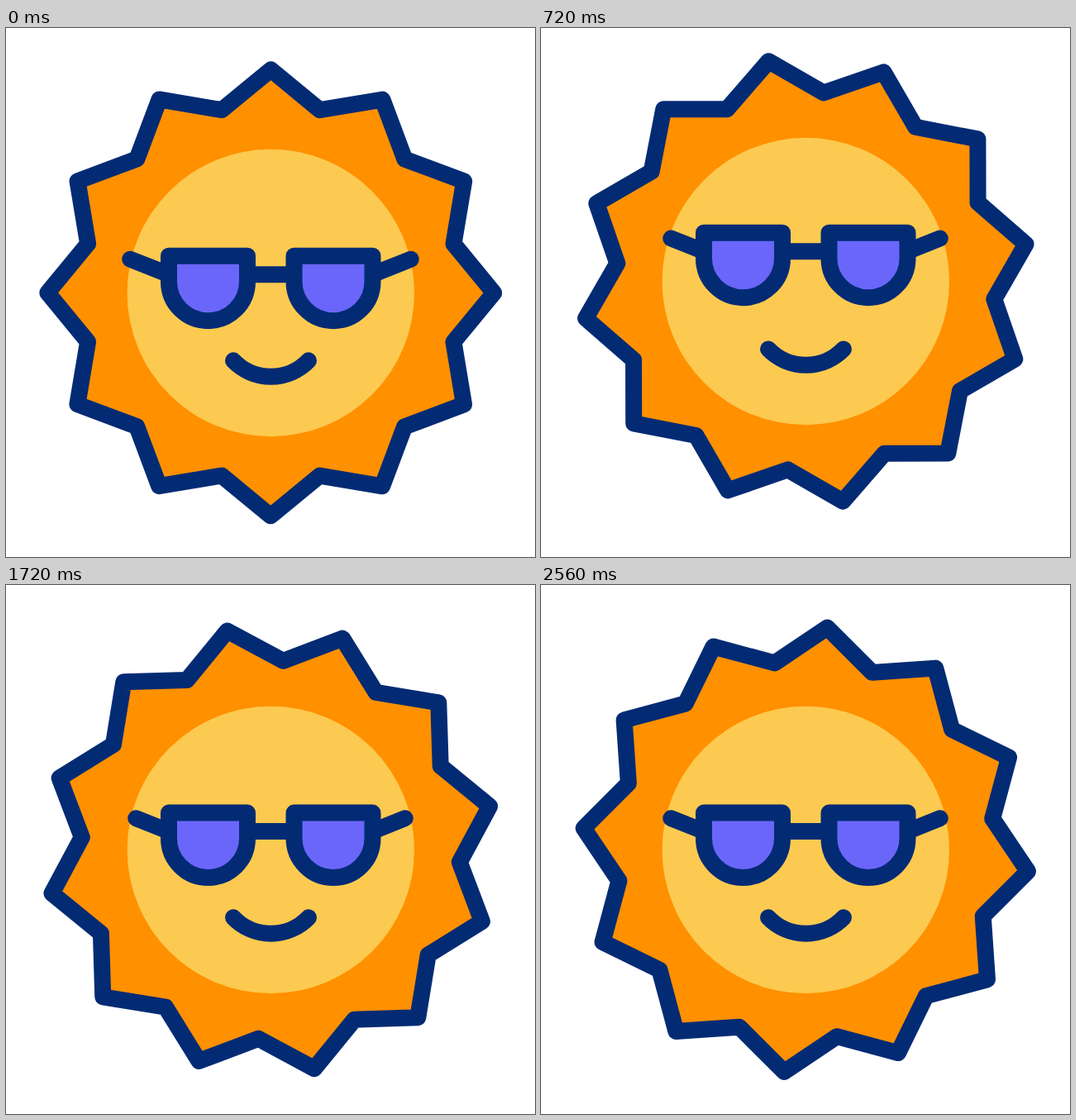
Animation of 640 by 640 pixels, one loop 2.6 s. Source, as an HTML page:

```html
<!DOCTYPE html>
<html lang="en">
<head>
<meta charset="utf-8">
<title>Sunny</title>
<style>
  html, body { margin: 0; height: 100%; overflow: hidden; background: #fff; }
  svg { display: block; width: 100%; height: 100%; }
  .line { fill: none; stroke: #032b74; stroke-width: 20; stroke-linecap: round; stroke-linejoin: round; }
</style>
</head>
<body>
<svg viewBox="0 0 640 640">
  <g id="sun">
    <polygon id="rays" class="line" style="fill:#ff9000"/>
    <circle cx="320.3" cy="320.4" r="173.7" fill="#fcca50"/>
    <path class="line" d="M275 402.3a63 63 0 0 0 91 0"/>
  </g>
  <g id="glasses" class="line">
    <path id="temples"/>
    <path d="M292 298H348"/>
    <path fill="#6b66fa" d="M197 275.5h95v31a47.5 47.5 0 0 1-95 0zM348.5 275.5h95v31a47.5 47.5 0 0 1-95 0z"/>
  </g>
</svg>
<script>
const LOOP = 2600, CENTER = 320.3, SPEED = 0.02833, BRAKE = 2030;
// time, sun offset, glasses offset
const KEYS = [
  [0, 0, 0], [300, 21.2, 42], [360, 20.2, 40.6], [560, -13, -26], [640, -22.3, -44.5],
  [720, -14, -28], [1010, 9.7, 21], [1080, 8.2, 19], [1350, -11.8, -23.5],
  [1440, -8.6, -17.2], [1667, 0, 0], [LOOP, 0, 0]
];
const $ = id => document.getElementById(id);

$('rays').setAttribute('points', Array.from({ length: 24 }, (_, i) => {
  const a = i * Math.PI / 12, r = i % 2 ? 229 : 270;
  return [CENTER + r * Math.sin(a), CENTER - r * Math.cos(a)].map(v => v.toFixed(2));
}).join(' '));

const slope = (i, c) => (KEYS[i + 1][c] - KEYS[i][c]) / (KEYS[i + 1][0] - KEYS[i][0]);

// Tangent that stays flat at every turning point
function tangent(i, c) {
  if (i === 0) return slope(0, c);
  if (i === KEYS.length - 1) return 0;
  const a = slope(i - 1, c), b = slope(i, c);
  return a * b > 0 ? 2 * a * b / (a + b) : 0;
}

function bounce(t, c) {
  const i = KEYS.findIndex((k, n) => n < KEYS.length - 1 && t < KEYS[n + 1][0]);
  const [a, b] = [KEYS[i], KEYS[i + 1]], span = b[0] - a[0];
  const u = (t - a[0]) / span, v = 1 - u;
  return v * v * (1 + 2 * u) * a[c] + u * u * (3 - 2 * u) * b[c]
    + span * u * v * (v * tangent(i, c) - u * tangent(i + 1, c));
}

function spin(t) {
  const late = Math.max(0, t - BRAKE);
  return SPEED * (t - late * late / (2 * (LOOP - BRAKE)));
}

function draw(t) {
  const p = Math.min(1, Math.max(0, (t - 360) / 300)), tuck = p * p * (3 - 2 * p);
  const x = 150.3 + 7 * tuck, y = 279.6 + 2.7 * tuck;
  $('sun').setAttribute('transform', `translate(0 ${bounce(t, 1)})`);
  $('rays').setAttribute('transform', `rotate(${spin(t)} ${CENTER} ${CENTER})`);
  $('glasses').setAttribute('transform', `translate(0 ${bounce(t, 2)})`);
  $('temples').setAttribute('d', `M${x} ${y}L197 298M${640 - x} ${y}L443.5 298`);
}

function tick() {
  draw(performance.now() % LOOP);
  requestAnimationFrame(tick);
}
tick();
</script>
</body>
</html>
```
